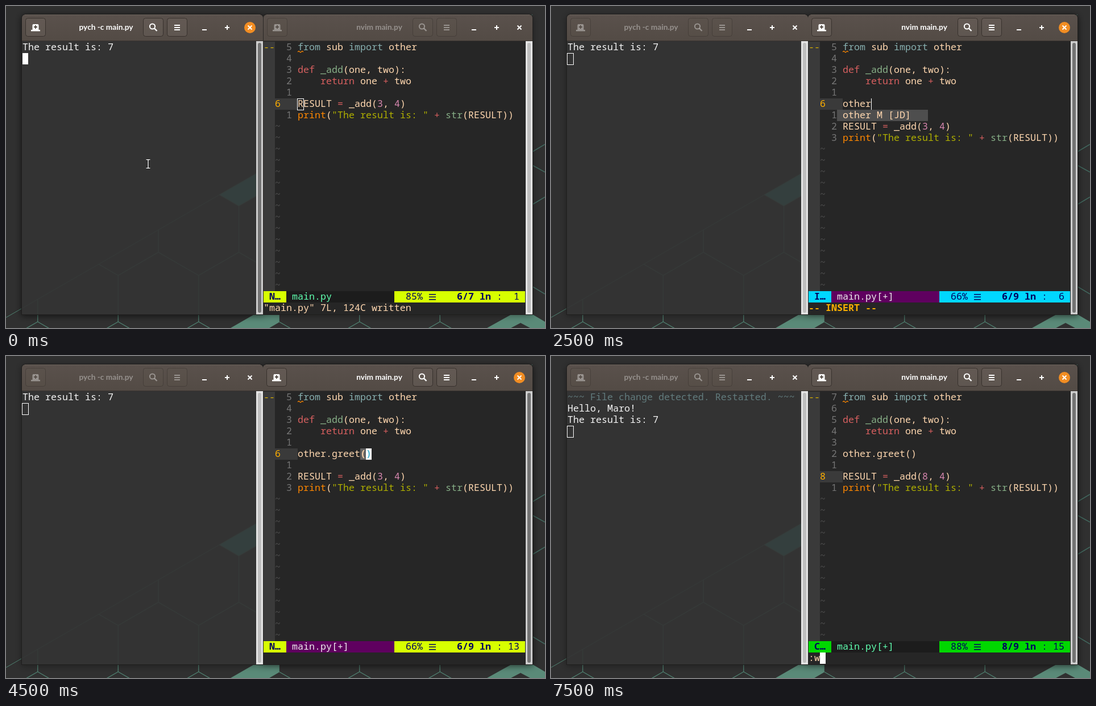
These frames come from a looping animation (948 by 568 pixels, 8000 ms). An HTML page with a canvas:

```html
<!DOCTYPE html>
<html lang="en">
<head>
<meta charset="utf-8">
<title>Live reload in the terminal</title>
<style>
html, body { margin: 0; width: 100%; height: 100%; overflow: hidden; background: #303030; }
canvas { display: block; }
</style>
</head>
<body>
<canvas id="stage" width="948" height="568"></canvas>
<script>
const ctx = document.getElementById('stage').getContext('2d');
const W = 948, H = 568, LOOP = 8000;
const CELL = 10, ROW = 20, TOP = 63;
const LEFT = 29, RIGHT = 453, CODE = 513;
const MONO = '16.667px "Noto Sans Mono", "DejaVu Sans Mono", monospace';
const TITLE = 'bold 13.7px Lato, "Open Sans", sans-serif';
const C = {
  bg: '#262626', fg: '#ffd7af', red: '#d75f5f', blue: '#87afaf', aqua: '#87af87',
  purple: '#d787af', orange: '#ff8700', green: '#afaf00', yellow: '#ffaf00',
  gray: '#767676', column: '#3a3a3a', navy: '#00005f', white: '#ffffff'
};
const WORDS = {
  from: C.blue, import: C.blue, def: C.red, return: C.red,
  print: C.orange, str: C.aqua, '+': C.red, '=': C.red
};
const MODES = { N: '#d7ff00', I: '#00d7ff', C: '#00d700' };

// Each step overrides part of the state from its time on.
const STEPS = [
  [0, { line: 6, col: 1, mode: 'N', gap: 1, call: '', arg: 3, msg: '"main.py" 7L, 124C written' }],
  [1300, { line: 5, mode: 'I', gap: 2, mod: true, msg: '-- INSERT --' }],
  [2000, { line: 6, gap: 3 }],
  [2100, { call: 'o', col: 2 }],
  [2400, { call: 'oth', col: 4 }],
  [2500, { call: 'other', col: 6, menu: ['other M', 0] }],
  [2600, { call: 'other.', col: 7, menu: null }],
  [2800, { call: 'other.g', col: 8, menu: ['greet f', 6] }],
  [2900, { call: 'other.gr', col: 9 }],
  [3000, { call: 'other.gre', col: 10 }],
  [3100, { call: 'other.greet', col: 12 }],
  [3500, { call: 'other.greet()', col: 13, menu: null }],
  [3600, { pair: [12, 13] }],
  [3800, { col: 14 }],
  [4500, { mode: 'N', col: 13, msg: '' }],
  [4700, { mode: 'C', msg: ':' }],
  [4800, { msg: ':w' }],
  [5000, { mode: 'N', mod: false, msg: '"main.py" 9L, 139C written', restarted: true }],
  [5600, { line: 7, col: 1, pair: null }],
  [5900, { line: 8, col: 13 }],
  [6000, { col: 14, pair: [14, 19] }],
  [6500, { col: 15, pair: null }],
  [6700, { pending: 'r' }],
  [7000, { pending: '', arg: 8, mod: true }],
  [7400, { mode: 'C', msg: ':' }],
  [7500, { msg: ':w' }]
];
const FADE = [0.25, 0.6, 0.85, 0.95];
const TRAIL = [[250, 278], [332, 284], [540, 293], [646, 299]];

function stateAt(t) {
  const s = {};
  for (const [start, change] of STEPS) if (t >= start) Object.assign(s, change);
  return s;
}

function rect(x, y, w, h, color) {
  ctx.fillStyle = color;
  ctx.fillRect(x, y, w, h);
}

function round(x, y, w, h, r, color) {
  ctx.beginPath();
  ctx.roundRect(x, y, w, h, r);
  ctx.fillStyle = color;
  ctx.fill();
}

function poly(points, color) {
  ctx.beginPath();
  points.forEach(([x, y]) => ctx.lineTo(x, y));
  ctx.closePath();
  ctx.fillStyle = color;
  ctx.fill();
}

function line(color, width, ...points) {
  ctx.beginPath();
  points.forEach(([x, y], i) => i ? ctx.lineTo(x, y) : ctx.moveTo(x, y));
  ctx.strokeStyle = color;
  ctx.lineWidth = width;
  ctx.stroke();
}

function text(str, x, row, color, bold) {
  ctx.font = (bold ? 'bold ' : '') + MONO;
  ctx.fillStyle = color;
  ctx.fillText(str, x, TOP + row * ROW + 15);
}

function outline(x, row) {
  ctx.strokeStyle = C.white;
  ctx.lineWidth = 1;
  ctx.strokeRect(x - 0.5, TOP + row * ROW + 0.5, 11, 20);
}

function wallpaper() {
  const teal = '#4f8070', side = 81.7, half = 70.75, slope = 0.577;
  rect(0, 0, W, H, '#303030');
  ctx.save();
  ctx.beginPath();
  [[0, 549], [926, 549 - 926 * slope], [926, H], [0, H]].forEach(([x, y]) => ctx.lineTo(x, y));
  ctx.clip();
  poly([[374, 332], [409, 353], [452, 328], [452, 288]], '#3fae9f');
  for (let r = 0; r < 3; r++) {
    const y = 352.7 + 1.5 * side * r;
    for (let x = 268 - 4 * half - (r % 2) * half; x < W + half; x += 2 * half) {
      line(teal, 1.3, [x, y + side], [x, y]);
      line(teal, 1.3, [x - half, y - side / 2], [x, y], [x + half, y - side / 2]);
    }
  }
  line(teal, 2, [0, 549], [926, 549 - 926 * slope]);
  ctx.restore();
  poly([[395, H], [480, 519], [480, 558], [463, H]], '#5a8a78');
  poly([[846, H], [889, 544], [926, 544], [W, 557], [W, H], [922, H], [905, 559], [888, H]], '#5a8a78');
  for (const [a, b] of [[257, 244], [281, 293], [350, 337], [495, 508]]) {
    line('#42695f', 1.5, [926, a], [W, b]);
  }
}

function shadow(x, w, focus) {
  ctx.save();
  ctx.beginPath();
  ctx.rect(0, 0, W, H);
  ctx.roundRect(x, 15, w, 529, [6, 6, 0, 0]);
  ctx.clip('evenodd');
  ctx.shadowColor = `rgba(0,0,0,${0.35 + 0.25 * focus})`;
  ctx.shadowBlur = 12;
  ctx.shadowOffsetY = 2;
  round(x - 1, 14, w + 2, 531, [7, 7, 0, 0], '#1f1e1d');
  ctx.restore();
}

function button(x, focus) {
  ctx.beginPath();
  ctx.roundRect(x - 17.5, 21.5, 35, 32, 4);
  ctx.fillStyle = `rgba(120,110,102,${0.05 + 0.25 * focus})`;
  ctx.fill();
  ctx.strokeStyle = `rgba(45,39,35,${0.35 + 0.4 * focus})`;
  ctx.lineWidth = 1;
  ctx.stroke();
}

function header(x, w, title, titleX, focus) {
  const end = x + w;
  const grad = ctx.createLinearGradient(0, 15, 0, 62);
  grad.addColorStop(0, '#5a514c');
  grad.addColorStop(1, '#534b45');
  round(x, 15, w, 47, [6, 6, 0, 0], grad);
  rect(x + 5, 15, w - 10, 1, '#6d645d');
  rect(x, 61, w, 1, '#3a3430');

  const ink = `rgba(255,255,255,${0.38 + 0.62 * focus})`;
  const tab = x + 24, find = end - 193, menu = end - 151;
  [tab, find, menu].forEach(b => button(b, focus));

  ctx.beginPath();
  ctx.roundRect(tab - 5.5, 32, 11, 10, [2, 2, 0, 0]);
  ctx.rect(tab - 8, 42, 16, 2.5);
  ctx.fillStyle = ink;
  ctx.fill();
  rect(tab - 3, 36, 6, 2, '#574f49');
  rect(tab - 1, 34, 2, 6, '#574f49');

  ctx.beginPath();
  ctx.arc(find - 1.5, 36, 4.6, 0, 7);
  ctx.strokeStyle = ink;
  ctx.lineWidth = 2;
  ctx.stroke();
  line(ink, 2.4, [find + 2, 39.5], [find + 6.5, 44]);
  for (let i = 0; i < 3; i++) rect(menu - 5, 33 + i * 4, 10, 2, ink);

  ctx.font = TITLE;
  ctx.fillStyle = ink;
  ctx.textAlign = 'center';
  ctx.fillText(title, titleX, 42);
  ctx.textAlign = 'left';

  const min = end - 103, max = end - 63, close = end - 23;
  rect(min - 4, 41, 8, 2, C.white);
  rect(max - 4, 37, 8, 2, C.white);
  rect(max - 1, 34, 2, 8, C.white);
  if (focus) {
    ctx.beginPath();
    ctx.arc(close, 38, 10, 0, 7);
    ctx.fillStyle = `rgba(241,141,35,${focus})`;
    ctx.fill();
  }
  line(C.white, 2, [close - 3.5, 34.5], [close + 3.5, 41.5]);
  line(C.white, 2, [close + 3.5, 34.5], [close - 3.5, 41.5]);
}

function scrollbar(x, focus) {
  const mix = (a, b) => Math.round(a + (b - a) * focus);
  const gray = v => `rgb(${v},${v},${v})`;
  rect(x, 62, 12, 482, gray(mix(228, 206)));
  round(x + 3, 65, 6, 476, 3, gray(mix(190, 116)));
}

function output(s, t, focus) {
  rect(28, 62, 412, 482, 'rgba(51,51,51,0.9)');
  let row = 0;
  if (s.restarted) {
    text('~~~ File change detected. Restarted. ~~~', LEFT, row++, '#627b7d');
    text('Hello, Maro!', LEFT, row++, '#f4f4f4');
  }
  text('The result is: 7', LEFT, row++, '#f4f4f4');
  if (focus) outline(LEFT, row);
  else if (t < 300) rect(LEFT, TOP + row * ROW, CELL, ROW, C.white);
}

function codeLines(s) {
  const middle = Array(s.gap).fill('');
  if (s.gap === 3) middle[1] = s.call;
  return [
    'from sub import other', '', 'def _add(one, two):', '    return one + two', ...middle,
    `RESULT = _add(${s.arg}, 4)`, 'print("The result is: " + str(RESULT))'
  ];
}

function colorOf(token, src) {
  if (token[0] === '"') return C.green;
  if (/^\d/.test(token)) return C.purple;
  if (token === '_add' && src.startsWith('def')) return C.aqua;
  return WORDS[token] || C.fg;
}

function codeLine(src, row) {
  for (const m of src.matchAll(/"[^"]*"|\w+|\S/g)) {
    text(m[0], CODE + m.index * CELL, row, colorOf(m[0], src));
  }
}

function statusBar(s, total) {
  const y = TOP + 22 * ROW, color = MODES[s.mode];
  const purple = s.mod && s.mode !== 'C';
  rect(RIGHT, y, 40, ROW, color);
  text(s.mode + '…', RIGHT + 10, 22, C.navy, true);
  rect(493, y, 190, ROW, purple ? '#5f005f' : '#1c1c1c');
  text('main.py' + (s.mod ? '[+]' : ''), 503, 22, purple ? '#eeeeee' : '#5fffaf');
  rect(683, y, 230, ROW, color);
  text(Math.floor(s.line * 100 / total) + '%', 703, 22, C.navy);
  for (let i = 0; i < 3; i++) rect(744, y + 5 + i * 4.5, 12, 1.5, C.navy);
  text(`${s.line}/${total} ln`, 793, 22, C.navy, true);
  text(':' + String(s.col).padStart(3), 863, 22, C.navy);
}

function editor(s, focus) {
  const lines = codeLines(s), cur = s.line - 1;
  const curX = CODE + (s.col - 1) * CELL, curY = TOP + cur * ROW;
  rect(452, 62, 462, 482, C.bg);
  rect(RIGHT, TOP, 20, 22 * ROW, C.column);
  rect(473, curY, 40, ROW, C.column);
  text('--', RIGHT, 0, '#d7af00');

  for (let row = 0; row < 22; row++) {
    if (row >= lines.length) {
      text('~', 473, row, '#4e4e4e');
    } else {
      if (row === cur) text(s.line, 473, row, C.yellow);
      else text(Math.abs(row - cur), 493, row, C.gray);
      codeLine(lines[row], row);
    }
  }
  line(C.orange, 1.2, [513, 81], [515, 79.5], [518, 82], [521, 79.5], [523, 81]);

  const cell = (col, back, ink, bold) => {
    const x = CODE + (col - 1) * CELL;
    rect(x, curY, CELL, ROW, back);
    text(lines[cur][col - 1] || ' ', x, cur, ink, bold);
  };
  const bold = !!s.pair;
  if (s.pair) s.pair.forEach(col => cell(col, '#626262', C.fg, true));

  if (s.menu) {
    const x = 503 + s.menu[1] * CELL;
    rect(x, curY + ROW, 160, ROW, '#4e4e4e');
    text(s.menu[0] + ' [JD]', x + CELL, cur + 1, C.fg);
  }

  statusBar(s, lines.length);
  const insert = s.mode === 'I';
  text(s.msg, RIGHT, 23, insert ? C.yellow : C.fg, insert);
  if (s.pending) text(s.pending, 803, 23, C.fg);

  if (!focus) outline(curX, cur);
  else if (insert) rect(curX, curY, 1, ROW, C.white);
  else if (s.mode === 'C') rect(RIGHT + s.msg.length * CELL, TOP + 23 * ROW, CELL, ROW, C.white);
  else if (s.pending) rect(curX, curY + 16, CELL, 4, C.white);
  else cell(s.col, C.white, '#45b2d0', bold);
}

function pointer(t) {
  if (t >= 1300) return;
  const [x, y] = TRAIL[Math.min(3, Math.max(0, Math.floor(t / 100) - 1))];
  for (const [color, width] of [['#111111', 3.4], [C.white, 1.4]]) {
    line(color, width, [x, y - 7], [x, y + 8]);
    line(color, width, [x - 3.5, y - 7], [x + 3.5, y - 7]);
    line(color, width, [x - 3.5, y + 8], [x + 3.5, y + 8]);
  }
}

function draw(t) {
  const s = stateAt(t);
  const focus = t < 600 ? 0 : FADE[Math.floor(t / 100) - 6] ?? 1;
  const edge = focus ? 452 : 453;
  wallpaper();
  shadow(28, 424, 1 - focus);
  shadow(452, 474, focus);
  output(s, t, focus);
  header(28, 424, 'pych -c main.py', 176, 1 - focus);
  scrollbar(440, 1 - focus);
  editor(s, focus);
  header(edge, 926 - edge, 'nvim main.py', 656.5, focus);
  scrollbar(914, focus);
  if (!focus) rect(452, 17, 1, 527, '#2b2826');
  pointer(t);
}

const began = performance.now();
function tick() {
  draw((performance.now() - began) % LOOP);
  requestAnimationFrame(tick);
}
tick();
</script>
</body>
</html>
```
